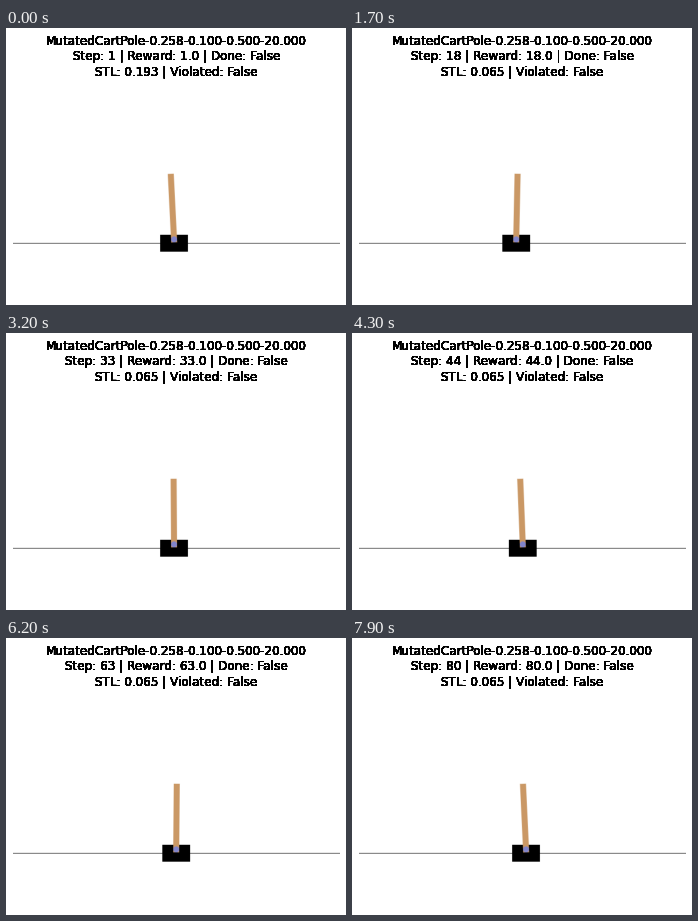
A matplotlib script for the animation above (8000 ms loop, 340 px wide and 277 px high).

```python
import math

import matplotlib.pyplot as plt
import numpy as np
from matplotlib.animation import FuncAnimation

W, H, DPI = 340, 277, 72
FRAMES, INTERVAL = 80, 100
MARGIN = 7.2
VIEW_W, VIEW_H = 326.4, 217.6

# The scene is painted at 600 x 400 and shrunk into the view.
SCENE_W, SCENE_H = 600, 400
TRACK_ROW, AXLE_ROW = 299, 292
CART_HALF = (25, 15)
POLE_HALF, POLE_REACH = 5, 120
CART = (0, 0, 0)
POLE = (202, 152, 101)
AXLE = (129, 132, 203)

# The pole tip drifts slowly while the cart sways underneath it.
KEYS = np.array([0, 17, 32, 43, 50, 62, 79])
CART_X = [295, 288, 295, 300, 295, 299, 306]
TIP_X = [289, 290.5, 294.2, 295.3, 299.7, 300, 300.4]
SWAY = 1.8
OVERPRINTS = 20

cols, rows = np.meshgrid(np.arange(SCENE_W), np.arange(SCENE_H))


def motion(frame):
    """Cart and tip positions, eased between the key poses."""
    k = min(np.searchsorted(KEYS, frame, side="right") - 1, len(KEYS) - 2)
    span = KEYS[k + 1] - KEYS[k]
    u = (frame - KEYS[k]) / span
    s = u * u * (3 - 2 * u)
    cart, tip = (v[k] + (v[k + 1] - v[k]) * s for v in (CART_X, TIP_X))
    swings = max(2, round(span / 3))
    return round(cart + SWAY * math.sin(math.pi * swings * u)), tip


def paint(img, cover, color):
    alpha = np.clip(cover, 0, 1)[..., None]
    img += alpha * (np.array(color) - img)


def scene(frame):
    x, tip = motion(frame)
    theta = math.asin((tip - x) / POLE_REACH)
    c, s = math.cos(theta), math.sin(theta)
    dx, up = cols - x, AXLE_ROW - rows
    across, along = dx * c - up * s, dx * s + up * c
    mid = (POLE_REACH - POLE_HALF) / 2
    half_len = (POLE_REACH + POLE_HALF) / 2

    img = np.full((SCENE_H, SCENE_W, 3), 255.0)
    paint(img, np.minimum(CART_HALF[0] + 1 - abs(dx),
                          CART_HALF[1] + 1 - abs(rows - TRACK_ROW)), CART)
    paint(img, np.minimum(POLE_HALF + 1 - abs(across),
                          half_len + 1 - abs(along - mid)), POLE)
    paint(img, POLE_HALF + 1 - np.hypot(dx, up), AXLE)
    img[TRACK_ROW] = 0
    return img.astype(np.uint8)


def caption(frame):
    step = frame + 1
    stl = 0.193 if frame < 4 else 0.065
    return (
        "MutatedCartPole-0.258-0.100-0.500-20.000\n"
        f"Step: {step} | Reward: {step:.1f} | Done: False\n"
        f"STL: {stl:.3f} | Violated: False"
    )


plt.rcParams["font.family"] = "DejaVu Sans"
fig = plt.figure(figsize=(W / DPI, H / DPI), dpi=DPI, facecolor="white")
ax = fig.add_axes([MARGIN / W, MARGIN / H, VIEW_W / W, VIEW_H / H])
ax.axis("off")
view = ax.imshow(scene(0), aspect="auto")

# Overprinting turns the soft edges of the lettering solid black.
titles = [fig.text((MARGIN + VIEW_W / 2) / W, 1 - 47 / H, "", fontsize=12,
                   ha="center", va="baseline")
          for _ in range(OVERPRINTS)]


def draw(frame):
    view.set_data(scene(frame))
    for title in titles:
        title.set_text(caption(frame))
    return [view, *titles]


anim = FuncAnimation(fig, draw, frames=FRAMES, interval=INTERVAL,
                     repeat=True, repeat_delay=0, blit=False)
plt.show()
```
